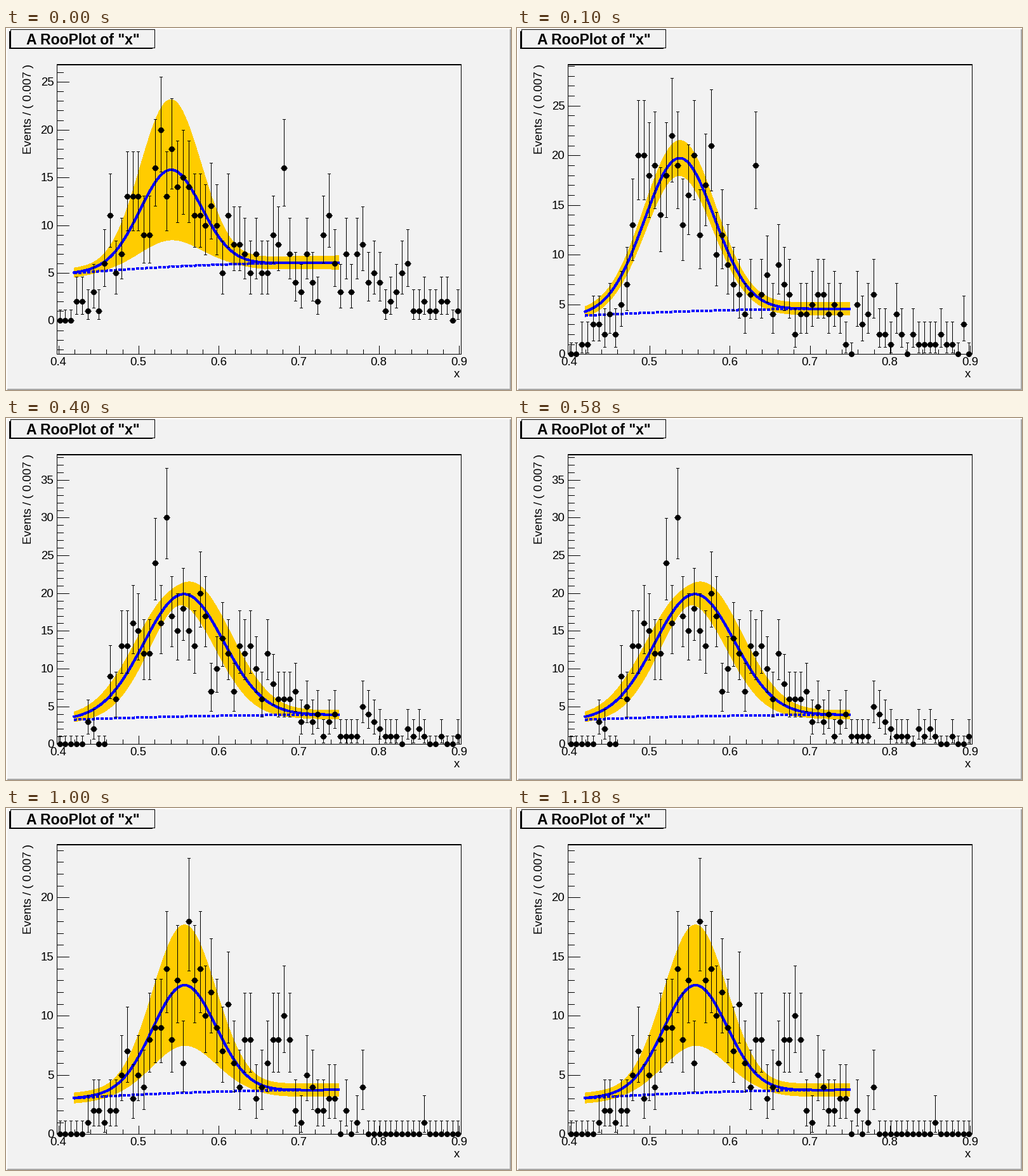
Animation of 796 by 572 pixels, one loop 1300 ms. Source, as a matplotlib script:

```python
import numpy as np
import matplotlib.pyplot as plt
from matplotlib.animation import FuncAnimation
from matplotlib.collections import LineCollection
from matplotlib.patches import Polygon, Rectangle

W, H, DPI = 796, 572, 100
LEFT, RIGHT, TOP, BOTTOM = 79.6, 716.4, 57.2, 514.8
X_MIN, X_MAX, BINS = 0.398, 0.902, 72
FIT_MIN, FIT_MAX = 0.42, 0.75
PAPER, BAND, BLUE = "#f2f2f2", "#ffcc00", "#0000ff"

plt.rcParams["font.family"] = "Liberation Sans"
fig = plt.figure(figsize=(W / DPI, H / DPI), dpi=DPI, facecolor=PAPER)
ax = fig.add_axes([0, 0, 1, 1])
ax.set(xlim=(0, W), ylim=(H, 0))
ax.axis("off")


def pt(px):
    return px * 72 / DPI


def snap(v):
    return np.floor(v) + 0.5


def px_x(x):
    return LEFT + (np.asarray(x) - X_MIN) / (X_MAX - X_MIN) * (RIGHT - LEFT)


def box(x0, y0, x1, y1, color, z=0):
    ax.add_patch(Rectangle((x0, y0), x1 - x0, y1 - y0, fc=color, lw=0,
                           zorder=z, antialiased=False))


def lines(segments, z):
    return ax.add_collection(LineCollection(
        segments, colors="black", linewidths=pt(1), zorder=z,
        antialiaseds=False, capstyle="projecting"))


def label(x, y, s, size=18.7, **kw):
    return ax.text(x, y, s, fontsize=pt(size), va="baseline", zorder=6, **kw)


def poisson_interval(n):
    """Central 68% interval, one-sided for empty bins."""
    m = np.maximum(n, 1)
    low = m * (1 - 1 / (9 * m) - 1 / (3 * np.sqrt(m))) ** 3
    k = n + 1
    high = k * (1 - 1 / (9 * k) + 1 / (3 * np.sqrt(k))) ** 3
    return np.where(n == 0, 0, low), np.where(n == 0, 1.148, high)


def draw_static():
    box(0, 0, W, 2, "white")
    box(0, 0, 2, H, "white")
    box(2, H - 2, W, H, "#a9a9a9")
    box(W - 2, 2, W, H, "#a9a9a9")

    box(5, 5, 231, 33, "black")
    box(7, 2, 235, 32, "black", 0.1)
    box(8, 3, 234, 31, PAPER, 0.2)
    label(121, 26.3, 'A RooPlot of "x"', 23, weight="bold", ha="center")

    l, r, t, b = 79.5, 716.5, 57.5, 514.5
    segs = [[(l, b), (l, t)], [(l, t), (r, t)], [(l, t - 1), (r, t - 1)],
            [(r, t), (r, b)], [(l, b), (r, b)]]
    for i in range(26):
        x = snap(px_x(0.4 + 0.02 * i))
        segs.append([(x, b), (x, b - (13 if i % 5 == 0 else 7))])
    lines(segs, 5)
    for i in range(4, 10):
        label(px_x(i / 10), 532.7, f"0.{i}", ha="center")
    label(715.5, 551.5, "x", ha="right")
    ax.text(40.5, 57, "Events / ( 0.007 )", fontsize=pt(18.7), rotation=90,
            ha="right", va="top", zorder=6).set(
                rotation_mode="anchor", ha="right", va="baseline")


def make_scene(counts, mean, sigma, amp, bg, err, bg_err, y_min=0):
    """mean and sigma in pixels; bg is (start, rise) of the background;
    err is (height, mean, width, height-mean covariance)."""
    n = np.array(counts, float)
    low, high = poisson_interval(n)
    y_max = 1.05 * high.max()

    def px_y(v):
        return BOTTOM - (v - y_min) / (y_max - y_min) * (BOTTOM - TOP)

    # axis
    ticks, art = [], []
    for v in range(int(np.ceil(y_min)), int(y_max) + 1):
        y = snap(px_y(v))
        ticks.append([(79.5, y), (98.5 if v % 5 == 0 else 89.5, y)])
        if v % 5 == 0:
            art.append(label(75.3, px_y(v) + 6.5, str(v), ha="right"))
    art.append(lines(ticks, 5))

    # fitted model and its uncertainty
    u = np.linspace(0, 1, 160)
    x = px_x(FIT_MIN + u * (FIT_MAX - FIT_MIN))
    z = (x - mean) / sigma
    g = np.exp(-z ** 2 / 2)
    back = bg[0] + bg[1] * (2 * u - u ** 2)
    model = amp * g + back
    a, b, d, c = err
    var = g ** 2 * (a * a + 2 * c * z + (b * z) ** 2 + (d * z * z) ** 2)
    dev = np.sqrt(var + (bg_err[0] + (bg_err[1] - bg_err[0]) * u) ** 2)
    edge = np.r_[np.c_[x, px_y(model + dev)],
                 np.c_[x, px_y(model - dev)][::-1]]
    art.append(ax.add_patch(Polygon(edge, fc=BAND, lw=0, zorder=1,
                                    antialiased=False)))
    style = dict(color=BLUE, lw=pt(3), antialiased=False)
    art += ax.plot(x, px_y(model), zorder=2, **style)
    art += ax.plot(x, px_y(back), zorder=2, dash_capstyle="butt",
                   linestyle=(0, (1.35, 0.8)), **style)

    # data points
    xs = snap(LEFT + (np.arange(BINS) + 0.5) * (RIGHT - LEFT) / BINS)
    bars = []
    for px, y, y0, y1 in zip(xs, *(snap(px_y(v)) for v in (n, low, high))):
        bars += [[(px, y0), (px, y1)], [(px - 5, y), (px + 5, y)]]
        bars += [[(px - 2, e), (px + 2, e)] for e in (y0, y1)]
    art.append(lines(bars, 3))
    art += ax.plot(xs, snap(px_y(n)), "o", color="black", ms=pt(9), mew=0,
                   zorder=4)
    return art


draw_static()
scenes = [
    make_scene(
        [0, 0, 0, 2, 2, 1, 3, 1, 6, 11, 5, 7, 13, 13, 13, 9, 9, 16,
         20, 13, 18, 14, 15, 14, 11, 11, 10, 12, 10, 5, 11, 8, 8, 7, 5, 7,
         5, 5, 9, 8, 16, 7, 4, 3, 7, 4, 2, 9, 11, 6, 3, 7, 3, 7,
         8, 4, 5, 4, 1, 2, 3, 5, 6, 1, 1, 2, 1, 1, 2, 2, 0, 1],
        259.5, 48, 10.16, (4.94, 1.12), (7.33, 0.5, 0.3, 0), (0.47, 0.7),
        y_min=-3.5),
    make_scene(
        [0, 0, 1, 1, 3, 3, 2, 4, 2, 5, 7, 13, 20, 20, 18, 19, 14, 18,
         22, 19, 13, 16, 20, 12, 17, 21, 10, 12, 9, 7, 6, 4, 6, 19, 6, 8,
         4, 9, 7, 6, 2, 4, 4, 5, 6, 6, 4, 5, 4, 1, 0, 5, 3, 4,
         6, 2, 2, 1, 4, 2, 0, 2, 1, 1, 1, 1, 2, 1, 1, 0, 3, 0],
        256, 55, 15.45, (3.84, 0.7), (1.68, 1.3, 0.5, 0.3), (0.5, 0.63)),
    make_scene(
        [0, 0, 0, 0, 0, 3, 2, 0, 0, 9, 6, 13, 13, 16, 15, 12, 12, 24,
         16, 30, 17, 15, 18, 15, 13, 20, 17, 7, 10, 14, 12, 7, 13, 12, 13, 10,
         6, 12, 8, 6, 6, 6, 7, 3, 5, 3, 4, 1, 3, 4, 1, 1, 1, 1,
         5, 4, 3, 2, 1, 1, 1, 0, 2, 1, 2, 1, 0, 0, 1, 0, 0, 1],
        280, 63, 16.2, (3.2, 0.65), (1.38, 3.6, 1.5, 2.5), (0.55, 0.57)),
    make_scene(
        [0, 0, 1, 0, 2, 3, 0, 3, 2, 5, 3, 20, 9, 7, 19, 7, 13, 16,
         18, 20, 5, 11, 18, 11, 13, 23, 9, 9, 12, 10, 10, 8, 10, 9, 15, 13,
         9, 7, 4, 10, 6, 5, 3, 4, 7, 3, 5, 1, 9, 1, 2, 3, 1, 2,
         3, 1, 1, 1, 0, 0, 0, 1, 1, 1, 0, 1, 0, 0, 1, 0, 0, 2],
        281, 64, 11.92, (3.63, 0.7), (0.95, 0.5, 0.2, 0), (0.4, 0.58)),
    make_scene(
        [0, 0, 0, 0, 0, 1, 2, 2, 1, 2, 2, 5, 7, 3, 5, 4, 8, 9,
         9, 14, 8, 13, 6, 18, 13, 14, 10, 12, 9, 7, 11, 6, 4, 8, 8, 3,
         4, 6, 8, 8, 10, 8, 2, 1, 5, 4, 2, 2, 3, 3, 0, 2, 0, 1,
         4] + [0] * 10 + [1] + [0] * 6,
        281, 50, 9.09, (3.01, 0.7), (5.07, 0.5, 0.3, 0), (0.43, 0.55)),
]


def update(step):
    # the first scene lasts one step, the others three each
    current = (step + 2) // 3
    for i, art in enumerate(scenes):
        for a in art:
            a.set_visible(i == current)
    return []


anim = FuncAnimation(fig, update, frames=13, interval=100, repeat=True,
                     repeat_delay=0, blit=False)
plt.show()
```
